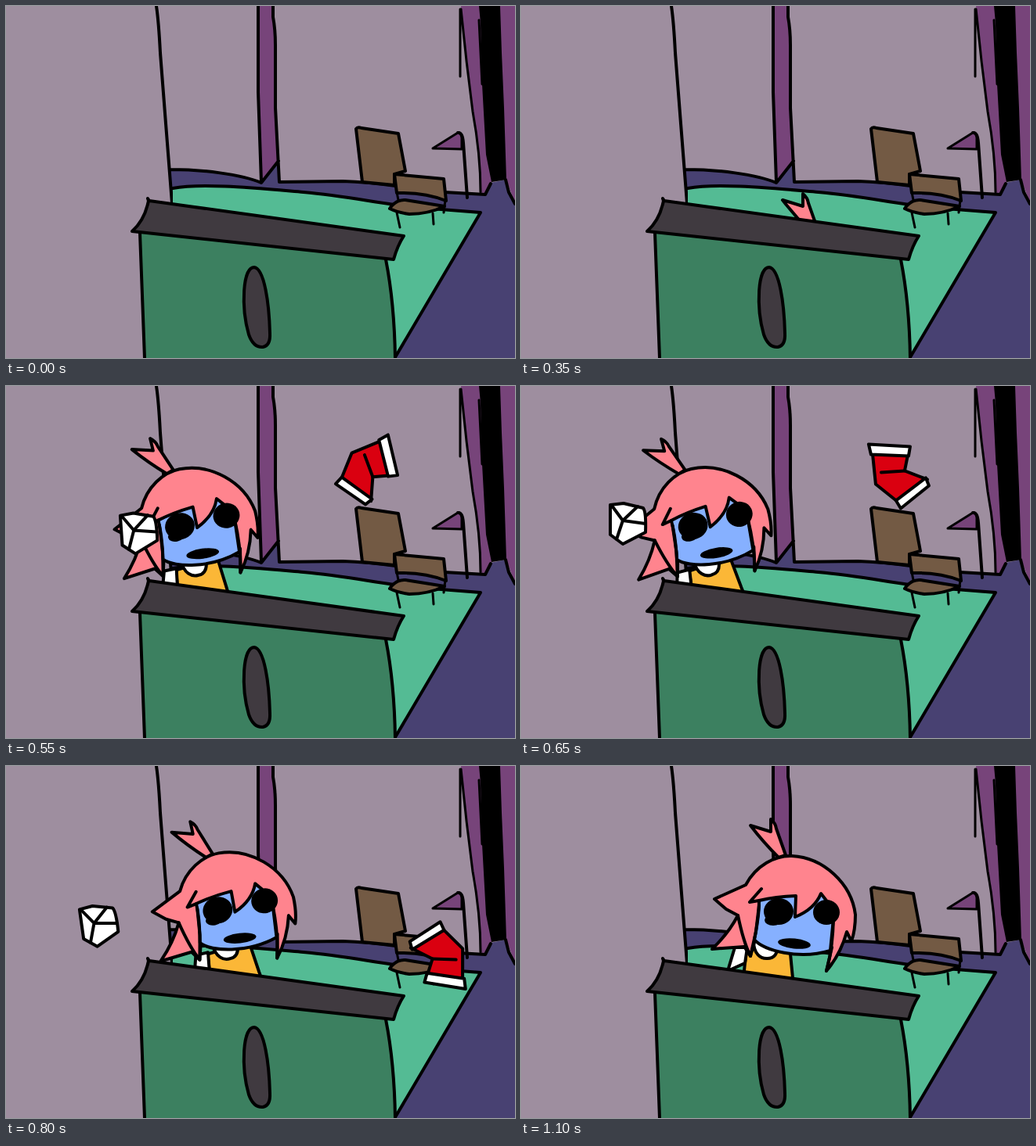
Animation, 650 px wide and 450 px high, one loop 2650 ms. Source, as an HTML page:

```html
<!DOCTYPE html>
<html lang="en">
<head>
<meta charset="utf-8">
<title>Behind the desk</title>
<style>
  html, body { margin: 0; width: 100%; height: 100%; overflow: hidden; background: #9e8e9f; }
  svg { display: block; width: 100%; height: 100%; }
  path, ellipse { stroke-linejoin: round; stroke-linecap: round; }
  .ink { stroke: #000; stroke-width: 4; fill: none; }
  .thin { stroke-width: 3; }
  .wall { fill: #9e8e9f; }
  .navy { fill: #484172; }
  .purple { fill: #77447a; }
  .top { fill: #54bb94; }
  .front { fill: #3c8060; }
  .dark { fill: #403a40; }
  .brown { fill: #735a44; }
  .pink { fill: #ff848e; }
  .skin { fill: #86b0ff; }
  .orange { fill: #fbb737; }
  .white { fill: #fff; }
  .red { fill: #da0010; }
</style>
</head>
<body>
<svg viewBox="0 0 650 450">
  <!-- room -->
  <path class="wall" d="M0 0H650V450H0Z"/>
  <path class="navy" d="M210 209C250 209 300 215 326 226L348 198L349 225L430 224C480 225 500 232 560 238L612 242L619 226L638 222L650 253V450H213Z"/>
  <path class="purple" d="M322 0V110L326 225L348 198L344 130V45L341 0Z"/>
  <path class="purple" d="M581 0L588 60L596 130Q606 190 606 240H614L622 220L639 222L650 252V0Z"/>
  <path d="M604 0L606 22L608 100L613 190L620 225L639 222L636 130L633 60L631 0Z"/>
  <path class="ink" d="M192 0Q195 20 197 60L204 150L212 252M210 209C250 209 300 215 326 226L348 198M322 0V110L326 225M341 0V14Q344 30 344 50V130L349 225L430 224C480 225 500 232 560 238L612 241L619 227M638 222L642 238L650 253"/>
  <path class="ink thin" d="M581 4L588 70L596 135Q606 190 606 238M604 18L608 100M580 4V90"/>
  <path class="ink top" d="M213 233C250 226 320 233 380 238C440 243 480 254 530 258L606 264L497 449L213 330"/>
  <!-- chairs and lamp -->
  <path class="ink brown" d="M447 157Q449 154 454 156L501 163L510 211L496 215V229L455 225Z"/>
  <path class="navy" d="M499 238L561 248L560 258L502 248Z"/>
  <path class="ink brown" d="M496 215L559 221L562 249Q535 238 499 239Z"/>
  <path class="ink brown" d="M490 259Q498 247 510 248L560 256Q540 266 515 266Q500 264 490 259Z"/>
  <path class="ink thin" d="M499 238L501 248M561 248L559 264M499 264L503 283M545 265L546 279"/>
  <path class="ink purple thin" d="M545 182L577 162Q581 161 582 168L582 183Z"/>
  <path class="ink" d="M577 162Q583 161 584 175L589 245"/>

  <!-- moving parts are drawn around their own pivot -->
  <g id="body"><g transform="translate(-313 -240)">
    <path class="ink orange" d="M288 234L286 252L280 310H352L347 271L343 230Z"/>
    <path class="ink white" d="M273 232L264 262L286 252L289 232Z"/>
    <path class="ink white" d="M297 224C297 240 306 247 315 246Q326 246 328 232V224Z"/>
  </g></g>
  <g id="head"><g transform="translate(-329 -185)">
    <path class="ink pink" d="M329 117Q309 97 293 76L319 84V68Q325 73 326 80L338 114Z"/>
    <path class="ink pink" d="M247 170L287 152C300 127 325 114 346 115C386 117 422 150 427 190Q427 210 422 224L416 212Q408 241 390 262L397 232L299 222L293 243L285 231L244 234Q265 214 277 191L262 183Z"/>
    <path class="ink skin" d="M304 174C304 195 300 210 298 222C310 236 355 248 395 236L399 195L390 172L383 163Q375 183 350 193L351 166Q325 167 304 172Z"/>
    <path class="ink" d="M307 157L292 174L304 172M277 191Q284 225 293 243M304 178L300 212L293 243M399 195Q398 235 390 262"/>
    <ellipse cx="329" cy="186" rx="19" ry="17"/>
    <ellipse cx="322" cy="197" rx="11" ry="7"/>
    <ellipse cx="390" cy="187" rx="17" ry="16"/>
    <ellipse cx="349" cy="227" rx="21" ry="6.5" transform="rotate(6 349 227)"/>
  </g></g>

  <!-- desk -->
  <path class="front" d="M171 288L177 450H497L492 370L485 322Z"/>
  <path class="ink" d="M171 290L177 450M485 324Q496 380 497 450"/>
  <g id="lid"><g transform="translate(-335 -285)">
    <path class="ink dark" d="M181 246L183 249L508 294Q500 306 495 324L161 288Q177 274 182 249Z"/>
  </g></g>
  <path class="ink dark" d="M317 334C302 334 300 385 310 420Q316 437 328 436Q338 434 337 418C336 380 330 336 317 334Z"/>

  <g id="pants"><g transform="translate(-486 -114)">
    <path class="ink red" d="M452 86L497 88L493 108L522 119L486 149L456 125Z"/>
    <path class="ink" d="M493 108L463 110"/>
    <path class="ink white" d="M447 74L500 77L498 89L450 87ZM482 146L520 117L524 127L488 156Z"/>
  </g></g>
  <g id="cube">
    <path class="ink white" d="M-22 -24L-5 -26L20 -20Q24 -15 23 11L-6 26L-22 14Z"/>
    <path class="ink" d="M-20 -23L-6 -4L23 0M13 -22L-6 -4L-14 20"/>
  </g>
</svg>
<script>
const LOOP = 2650, STEP = 50;

function progress(t, start, end) {
  return Math.min(1, Math.max(0, (t - start) / (end - start)));
}

function place(id, x, y, angle, visible = true) {
  const node = document.getElementById(id);
  node.setAttribute('transform', `translate(${x} ${y}) rotate(${angle})`);
  node.setAttribute('visibility', visible ? 'visible' : 'hidden');
}

// The lid rattles before anyone pops up.
function drawLid(t) {
  const shaking = t >= 100 && t < 350;
  place('lid', 335, 285, shaking ? 0.7 * Math.cos(Math.PI * t / STEP) : 0);
}

// Pops up leaning left, then swings right and settles with a small bounce.
function drawGirl(t) {
  const crouch = Math.exp((350 - t) / 50);
  const lag = Math.sqrt(crouch);
  const swing = progress(t, 650, 900);
  const turn = swing ** 3;
  const settle = 1 - progress(t, 900, 1100);
  const bounce = 2 * swing * settle * Math.cos(Math.max(0, t - 900) / 18);

  const x = 219 + 151 * crouch + 110 * swing ** 1.5;
  const y = 178 + 179 * crouch ** 1.6 + 7 * swing + bounce;
  const visible = t >= 350;
  place('head', x, y, -16 * (1 - lag - turn), visible);
  place('body', x + 21 - 37 * turn, y + 58 - 3 * turn, -17 * (1 - turn) + 40 * lag, visible);
}

// Tossed up with a slow peak, then tumbles down to the right.
function drawPants(t) {
  const fromPeak = (t - 600) / 300;
  const height = fromPeak < 0 ? 140 : 336;
  const x = 452 + 175 * progress(t, 400, 900) ** 2.5;
  const y = 109 + height * Math.abs(fromPeak) ** 2.3;
  const s = (t - 450) / 100;
  const angle = 140 - 71 * s + 8.3 * s ** 2 - 3.9 * s ** 3;
  place('pants', x, y, angle, t >= 400 && t < 950);
}

// Floats up to the left, hangs for a moment and drops.
function drawCube(t) {
  const rise = Math.max(0, (650 - t) / 200);
  const fall = Math.max(0, (t - 750) / 150);
  const x = 136 + 67 * rise - 51 * fall;
  const y = 176 + 48 * rise ** 2 + 146 * fall ** 1.5;
  place('cube', x, y, -8 * rise - 24 * fall, t >= 400 && t < 1000);
}

function tick() {
  const t = Math.floor(performance.now() % LOOP / STEP) * STEP;
  for (const draw of [drawLid, drawGirl, drawPants, drawCube]) draw(t);
  requestAnimationFrame(tick);
}
tick();
</script>
</body>
</html>
```
